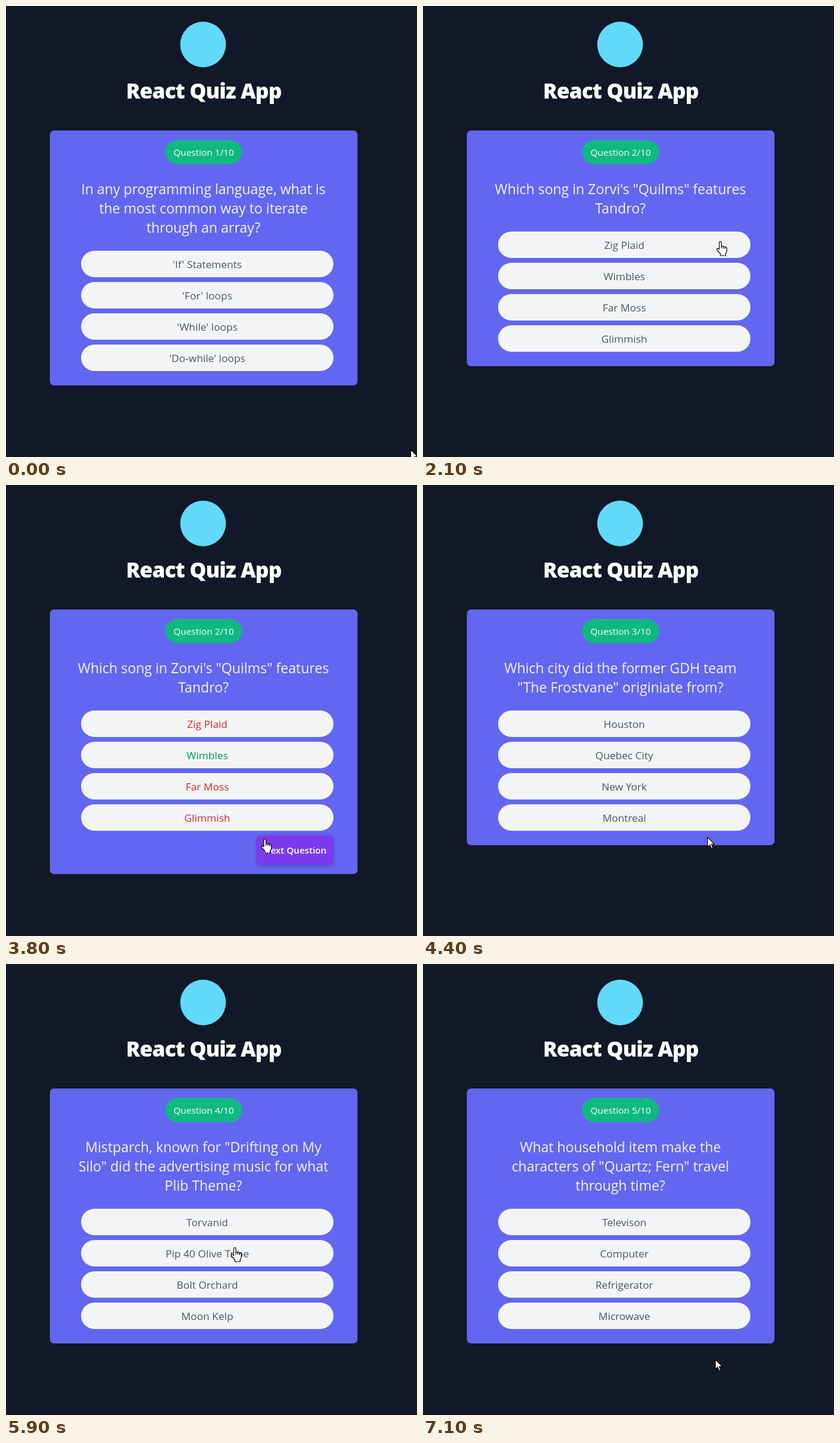
Recreate the animation shown at these times as an HTML page. Size 684 by 750 pixels, loop 7200 ms.

```html
<!DOCTYPE html>
<html lang="en">
<head>
<meta charset="utf-8">
<title>React Quiz App</title>
<style>
  html, body { margin: 0; width: 100%; height: 100%; overflow: hidden; background: #111827; }
  svg { display: block; width: 684px; height: 750px; font-family: "Open Sans", "Noto Sans", sans-serif; }
  text { text-anchor: middle; fill: #f3f4f6; }
  .title { font-size: 35px; font-weight: 800; letter-spacing: -.9px; fill: #fff; }
  .card { fill: #6366f1; }
  .badge { fill: #10b981; }
  .count { font-size: 15.25px; fill: #fff; }
  .ask { font-size: 22.9px; }
  .option { fill: #f3f4f6; }
  .answer { font-size: 17.2px; fill: #4b5563; }
  .done .answer { fill: #dc2626; }
  .done .right { fill: #059669; }
  .next { display: none; }
  .done .next { display: inline; }
  .next rect { fill: #7c3aed; filter: drop-shadow(0 2px 3px rgb(0 0 0 / .25)); }
  .next text { font-size: 15.1px; font-weight: 600; fill: #fff; }
  #cursor path { fill: #fff; stroke: #000; stroke-width: 1.2; stroke-linejoin: round; }
</style>
</head>
<body>
<svg id="stage" viewBox="0 0 684 750">
  <circle cx="328" cy="64" r="38" fill="#61dafb"/>
  <text class="title" x="329" y="154">React Quiz App</text>
  <g id="quiz"></g>
  <g id="cursor">
    <path id="arrow" d="M.5 .5V17L4.300 13.400L7 19.500L9.600 18.400L7 12.400H12Z"/>
    <g id="hand" transform="translate(-6)">
      <path d="M5 14V2.500a1.800 1.800 0 0 1 3.600 0V8l7 1.500q2 .5 2 2.500v5l-2 4v3H7v-3L1.500 15q-1.500-2.500 .5-3 1.500 0 3 2z"/>
      <path d="M8.600 8v4M11.600 8.700v3.500M14.600 9.400v3.500"/>
    </g>
  </g>
</svg>
<script>
const LOOP = 7200, STEP = 100;

// start: question appears, done: answer is picked, right: correct option
const questions = [
  { start: 0, done: 800, right: 1,
    lines: ["In any programming language, what is", "the most common way to iterate", "through an array?"],
    options: ["'If' Statements", "'For' loops", "'While' loops", "'Do-while' loops"] },
  { start: 1700, done: 3300, right: 1,
    lines: ["Which song in Zorvi's \"Quilms\" features", "Tandro?"],
    options: ["Zig Plaid", "Wimbles", "Far Moss", "Glimmish"] },
  { start: 4200, done: 4900, right: 1,
    lines: ["Which city did the former GDH team", "\"The Frostvane\" originiate from?"],
    options: ["Houston", "Quebec City", "New York", "Montreal"] },
  { start: 5500, done: 6100, right: 2,
    lines: ["Mistparch, known for \"Drifting on My", "Silo\" did the advertising music for what", "Plib Theme?"],
    options: ["Torvanid", "Pip 40 Olive Tribe", "Bolt Orchard", "Moon Kelp"] },
  { start: 6900, done: LOOP, right: 3,
    lines: ["What household item make the", "characters of \"Quartz; Fern\" travel", "through time?"],
    options: ["Televison", "Computer", "Refrigerator", "Microwave"] }
];

// pointer stops: time, x, y
const stops = [
  [0, 673, 737], [700, 440, 435], [900, 440, 435], [1500, 500, 638], [1700, 500, 638],
  [2100, 494, 391], [2400, 345, 455], [2700, 245, 500], [3100, 292, 523], [3300, 298, 536],
  [3400, 298, 536], [4000, 476, 606], [4200, 476, 606], [4400, 473, 585], [4800, 350, 447],
  [4900, 350, 447], [5400, 470, 608], [5500, 470, 608], [5900, 380, 471], [6100, 380, 474],
  [6700, 487, 645], [6900, 487, 645], [7100, 486, 657]
];

const $ = id => document.getElementById(id);

function add(parent, tag, attrs, text) {
  const el = document.createElementNS("http://www.w3.org/2000/svg", tag);
  for (const key in attrs) el.setAttribute(key, attrs[key]);
  if (text) el.textContent = text;
  return parent.appendChild(el);
}

const box = (parent, cls, x, y, width, height, rx) =>
  add(parent, "rect", { class: cls, x, y, width, height, rx });
const label = (parent, cls, x, y, text) =>
  add(parent, "text", { class: cls, x, y }, text);

function build(q, i) {
  const g = q.group = add($("quiz"), "g", {});
  q.top = 311 + 32 * q.lines.length;
  q.card = box(g, "card", 73, 207, 512, 0, 7);
  box(g, "badge", 265, 223, 128, 40, 20);
  label(g, "count", 329, 249, `Question ${i + 1}/10`);
  q.lines.forEach((line, n) => label(g, "ask", 328.5, 313 + 32 * n, line));
  q.options.forEach((option, n) => {
    const y = q.top + 52 * n;
    box(g, "option", 125, y, 420, 44, 22);
    label(g, n === q.right ? "answer right" : "answer", 335, y + 29, option);
  });
  const next = add(g, "g", { class: "next" });
  box(next, "", 417, q.top + 208, 128, 48, 6);
  label(next, "", 481, q.top + 238, "Next Question");
}

function pointerAt(t) {
  const i = stops.findLastIndex(s => s[0] <= t);
  const a = stops[i], b = stops[i + 1] || a;
  const u = b === a ? 0 : (t - a[0]) / (b[0] - a[0]);
  const k = u * u * (3 - 2 * u);
  return [a[1] + (b[1] - a[1]) * k, a[2] + (b[2] - a[2]) * k];
}

function overButton(q, done, x, y) {
  const dy = y - q.top;
  if (x < 125 || x > 545 || dy < 0) return false;
  if (dy < 200) return dy % 52 < 44;
  return done && x > 417 && dy > 208 && dy < 256;
}

function draw(t) {
  const q = questions.findLast(item => item.start <= t);
  const done = t >= q.done;
  for (const item of questions) item.group.style.display = item === q ? "inline" : "none";
  q.group.setAttribute("class", done ? "done" : "");
  q.card.setAttribute("height", q.top + (done ? 272 : 224) - 207);

  const [x, y] = pointerAt(t);
  const hand = overButton(q, done, x, y);
  $("cursor").setAttribute("transform", `translate(${Math.round(x)} ${Math.round(y)})`);
  $("hand").style.display = hand ? "inline" : "none";
  $("arrow").style.display = hand ? "none" : "inline";
}

function tick() {
  const t = performance.now() % LOOP;
  draw(Math.floor(t / STEP) * STEP);
  requestAnimationFrame(tick);
}

questions.forEach(build);
tick();
</script>
</body>
</html>
```
